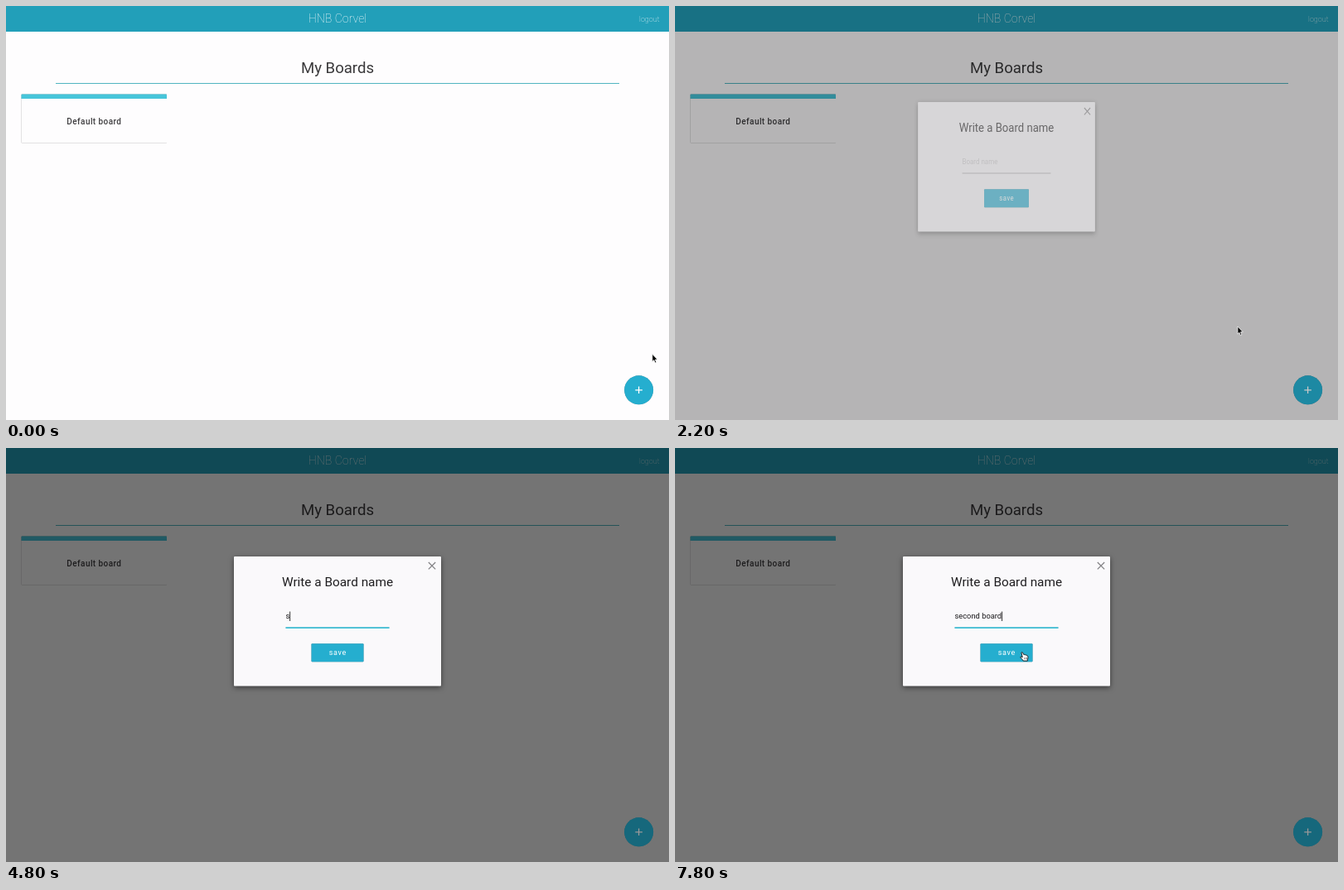
Write an HTML page that moves like this. It is 800 px wide and 500 px high and loops after 8 s.

```html
<!DOCTYPE html>
<html lang="en">
<head>
<meta charset="utf-8">
<title>My Boards</title>
<style>
  html, body { margin: 0; width: 100%; height: 100%; overflow: hidden; background: #fefdfe; }
  svg { display: block; width: 800px; height: 500px; font-family: Roboto, sans-serif; }
  text { white-space: pre; }
  .mid { text-anchor: middle; }
  .low { filter: drop-shadow(0 .8px .7px rgba(0, 0, 0, .42)); }
  .high { filter: drop-shadow(0 2.5px 3px rgba(0, 0, 0, .5)); }
</style>
</head>
<body>
<svg viewBox="0 0 800 500">
  <rect width="800" height="500" fill="#fefdfe"/>
  <rect width="800" height="31" fill="#229fb9"/>
  <g fill="#fff" font-weight="100">
    <text class="mid" x="400" y="19.6" font-size="14.2">HNB Corvel</text>
    <text x="788.5" y="18.8" font-size="9" text-anchor="end">logout</text>
  </g>
  <text class="mid" x="400" y="81.4" font-size="18.6" fill="#3a393b">My Boards</text>
  <rect x="60" y="93" width="680" height="1" fill="#52b5c1"/>

  <g class="low">
    <rect x="18.5" y="106.5" width="175.5" height="59" rx="1" fill="#fefdfe"/>
    <path d="M18.5 112V107.500q0-1 1-1H193q1 0 1 1V112z" fill="#47c5da"/>
  </g>
  <text class="mid" x="106.400" y="142.700" font-size="10" font-weight="500" letter-spacing=".42" fill="#3f3e40">Default board</text>

  <rect id="shade" width="800" height="500" opacity="0"/>

  <g class="low">
    <circle cx="763.6" cy="463.800" r="17.500" fill="#25aecf"/>
    <path d="M759.300 463.800h8.600M763.600 459.500v8.600" stroke="#fff" stroke-width="1.300"/>
    <circle id="fabShade" cx="763.6" cy="463.800" r="17.500" opacity="0"/>
  </g>

  <g id="modal">
    <rect class="high" x="275" y="131" width="250" height="156.500" rx="1" fill="#faf9fb"/>
    <path d="M509.800 138l8.400 8.400M518.200 138l-8.400 8.400" stroke="#858487" stroke-width="1.300"/>
    <text class="mid" x="400" y="167" font-size="15.350" fill="#1f1e20">Write a Board name</text>
    <text id="hint" x="337.400" y="206.400" font-size="9.350" fill="#cbcacd">Board name</text>
    <text id="typed" x="337.400" y="206.400" font-size="9.350" fill="#1c1b1d"></text>
    <rect id="caret" y="197.500" width=".9" height="11.500" fill="#222"/>
    <rect x="337.500" y="216.600" width="125" height=".8" fill="#9a999c"/>
    <rect id="focus" x="337.500" y="216.400" width="125" height="1.500" fill="#28bdd8"/>
    <rect class="low" x="368.500" y="236.200" width="63" height="22" rx="1" fill="#25aecf"/>
    <text class="mid" x="400.300" y="250.100" font-size="9" letter-spacing=".6" fill="#fff">save</text>
  </g>

  <g id="arrow">
    <path d="M0 0V9.200L2 7.400L3.500 10.800L5 10.100L3.600 6.800H6.400Z" stroke="#fff" stroke-width=".8" stroke-linejoin="round"/>
  </g>
  <g id="beam">
    <path d="M-1.800-5Q0-5 0-4Q0-5 1.800-5M0-4V4M-1.800 5Q0 5 0 4Q0 5 1.800 5M-1 1H1" fill="none" stroke="#222" stroke-width=".9"/>
  </g>
  <g id="hand">
    <path d="M-2.600-4.200Q-1.600-5.200-.8-4L.4-1.600Q1.200-2.300 2-1.400Q3-1.900 3.600-.9Q4.800-1.200 5.200 0Q6 2.500 4.800 4.300V5.800H-.2Q-.8 4.300-2.200 3.300Q-4 1.700-3.600 1Q-2.800 .2-1.200 1.400Z" fill="#fff" stroke="#111" stroke-width=".9" stroke-linejoin="round"/>
    <path d="M1.200 1.800V4M2.600 1.600V4M4 1.500V4" stroke="#222" stroke-width=".5"/>
  </g>
</svg>
<script>
  const LOOP = 8000;
  const LEFT = 337.4;
  const $ = id => document.getElementById(id);
  const pointers = ['arrow', 'beam', 'hand'];

  // Each step changes part of the state from its time on.
  const steps = [
    [0, { pointer: 'arrow', x: 779.8, y: 420.3, open: 0, shade: 0, focus: 0, caret: 0, text: '' }],
    [200, { x: 775, y: 446 }],
    [400, { pointer: 'hand', x: 770.5, y: 470.3 }],
    [2200, { pointer: 'arrow', x: 678.9, y: 387, open: 0.5, shade: 0.29 }],
    [2400, { x: 446.8, y: 234, open: 1, shade: 0.54 }],
    [2600, { pointer: 'beam', x: 441, y: 212 }],
    [2800, { x: 440, y: 210.2, focus: 0.5, caret: 1 }],
    [3000, { focus: 1 }],
    [3400, { caret: 0 }],
    [3800, { caret: 1 }],
    [4200, { caret: 0 }],
    [4800, { pointer: '', caret: 1, text: 's' }],
    [5000, { text: 'sec' }],
    [5200, { text: 'seco' }],
    [5400, { text: 'second' }],
    [5600, { text: 'second ' }],
    [6000, { caret: 0 }],
    [6600, { caret: 1, text: 'second b' }],
    [6800, { text: 'second bo' }],
    [7200, { text: 'second boar' }],
    [7400, { text: 'second board' }],
    [7600, { pointer: 'arrow', x: 432, y: 230 }],
    [7800, { pointer: 'hand', x: 420.5, y: 251.3 }]
  ];

  function stateAt(t) {
    return Object.assign({}, ...steps.filter(s => s[0] <= t).map(s => s[1]));
  }

  function draw(s) {
    $('shade').setAttribute('opacity', s.shade);
    $('fabShade').setAttribute('opacity', s.shade * 0.75);

    const modal = $('modal');
    const sx = 0.71 + 0.29 * s.open;
    modal.setAttribute('opacity', s.open);
    modal.setAttribute('transform',
      `translate(400 ${-30 * (1 - s.open)}) scale(${sx} 1) translate(-400 0)`);

    const typed = $('typed');
    typed.textContent = s.text.replace(/ /g, '\u00a0');
    $('hint').setAttribute('opacity', s.text ? 0 : 1);
    const end = s.text ? typed.getComputedTextLength() : 0;
    $('caret').setAttribute('x', LEFT + end);
    $('caret').setAttribute('opacity', s.caret);
    $('focus').setAttribute('opacity', s.focus);

    for (const id of pointers) {
      const el = $(id);
      el.setAttribute('opacity', id === s.pointer ? 1 : 0);
      el.setAttribute('transform', `translate(${s.x} ${s.y})`);
    }
  }

  const start = performance.now();
  function tick() {
    draw(stateAt((performance.now() - start) % LOOP));
    requestAnimationFrame(tick);
  }
  tick();
</script>
</body>
</html>
```
